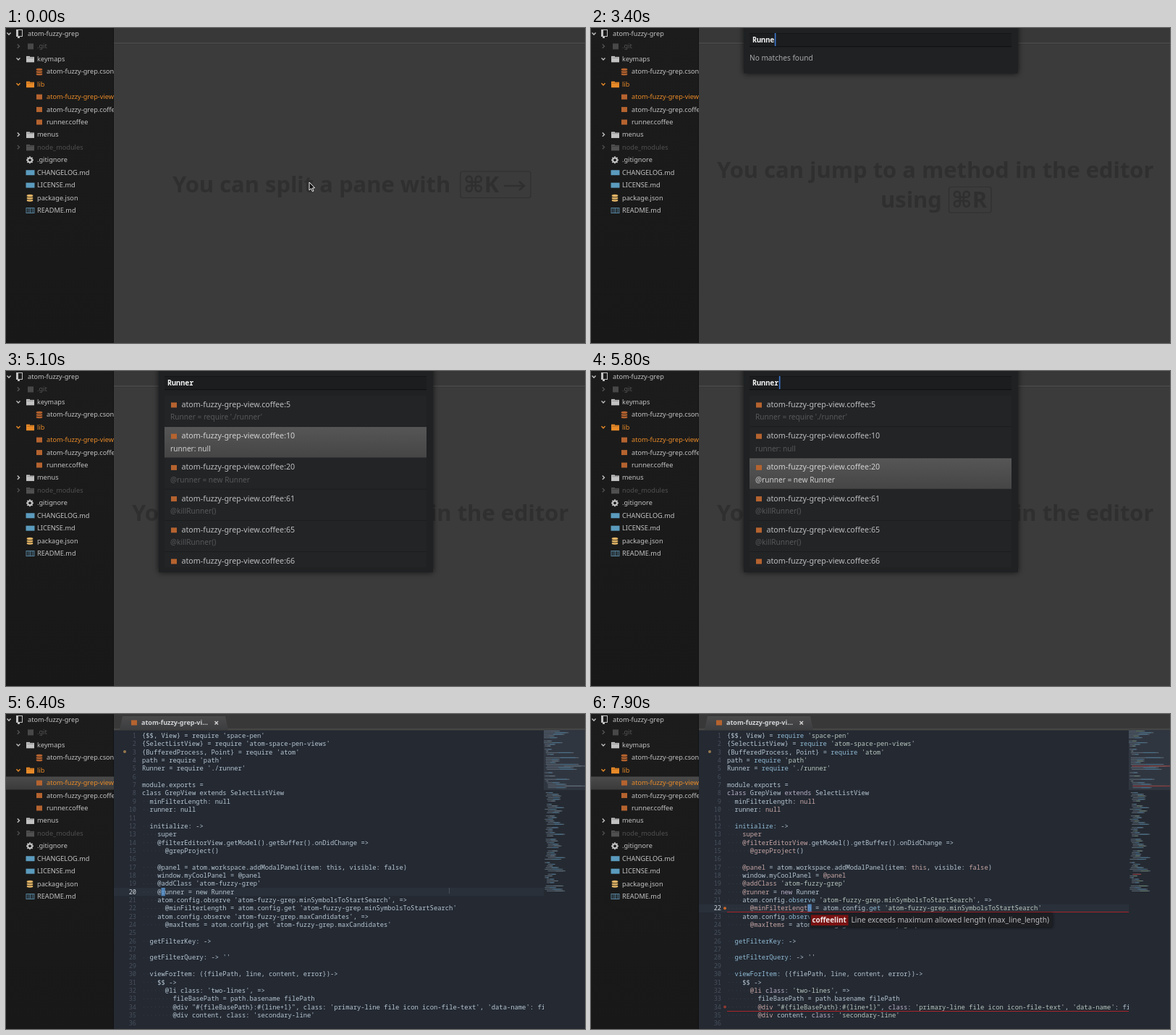
An HTML page with a canvas that plays this animation: 800 by 435 pixels, repeating every 8000 ms.

```html
<!DOCTYPE html>
<html lang="en">
<head>
<meta charset="utf-8">
<title>atom-fuzzy-grep</title>
<style>
html, body { margin: 0; width: 100%; height: 100%; overflow: hidden; background: #3b3b3b; }
canvas { display: block; width: 800px; height: 435px; }
</style>
</head>
<body>
<canvas id="stage" width="800" height="435"></canvas>
<script>
const ctx = document.getElementById('stage').getContext('2d');
const LOOP = 8000;
const UI = '"Noto Sans", "Open Sans", sans-serif';
const MONO = '"Noto Sans Mono", "DejaVu Sans Mono", monospace';
const ORANGE = '#e88a28', CUP = '#b5632f', LABEL = '#c2c2c2';
const CODE_X = 188, CHAR_W = 5.305, LINE_H = 11.35, LINE_Y = 30;

const tree = [
  // depth, label, icon, chevron, colour, icon tint
  [0, 'atom-fuzzy-grep', 'repo', 'down', LABEL],
  [1, '.git', 'git', 'right', '#555'],
  [1, 'keymaps', 'folder', 'down', LABEL],
  [2, 'atom-fuzzy-grep.cson', 'data', '', LABEL, CUP],
  [1, 'lib', 'folder', 'down', ORANGE],
  [2, 'atom-fuzzy-grep-view.coffee', 'cup', '', ORANGE],
  [2, 'atom-fuzzy-grep.coffee', 'cup', '', LABEL],
  [2, 'runner.coffee', 'cup', '', LABEL],
  [1, 'menus', 'folder', 'right', LABEL],
  [1, 'node_modules', 'folder', 'right', '#505050'],
  [1, '.gitignore', 'gear', '', LABEL],
  [1, 'CHANGELOG.md', 'doc', '', LABEL],
  [1, 'LICENSE.md', 'doc', '', LABEL],
  [1, 'package.json', 'data', '', LABEL, '#e3b566'],
  [1, 'README.md', 'book', '', LABEL]
];

const results = [
  [5, "Runner = require './runner'"],
  [10, 'runner: null'],
  [20, '@runner = new Runner'],
  [61, '@killRunner()'],
  [65, '@killRunner()'],
  [66, '']
];

const code = `{$$, View} = require 'space-pen'
{SelectListView} = require 'atom-space-pen-views'
{BufferedProcess, Point} = require 'atom'
path = require 'path'
Runner = require './runner'

module.exports =
class GrepView extends SelectListView
  minFilterLength: null
  runner: null

  initialize: ->
    super
    @filterEditorView.getModel().getBuffer().onDidChange =>
      @grepProject()

    @panel = atom.workspace.addModalPanel(item: this, visible: false)
    window.myCoolPanel = @panel
    @addClass 'atom-fuzzy-grep'
    @runner = new Runner
    atom.config.observe 'atom-fuzzy-grep.minSymbolsToStartSearch', =>
      @minFilterLength = atom.config.get 'atom-fuzzy-grep.minSymbolsToStartSearch'
    atom.config.observe 'atom-fuzzy-grep.maxCandidates', =>
      @maxItems = atom.config.get 'atom-fuzzy-grep.maxCandidates'

  getFilterKey: ->

  getFilterQuery: -> ''

  viewForItem: ({filePath, line, content, error})->
    $$ ->
      @li class: 'two-lines', =>
        fileBasePath = path.basename filePath
        @div "#{fileBasePath}:#{line+1}", class: 'primary-line file icon icon-file-text', 'data-name': fileBasePath
        @div content, class: 'secondary-line'
`.split('\n');

function rect(x, y, w, h, fill) {
  ctx.fillStyle = fill;
  ctx.fillRect(x, y, w, h);
}

function text(str, x, y, size, color, weight = 400, family = UI) {
  ctx.font = `${weight} ${size}px ${family}`;
  ctx.fillStyle = color;
  ctx.fillText(str, x, y);
}

function line(points, color, width = 1) {
  ctx.beginPath();
  points.forEach(([x, y]) => ctx.lineTo(x, y));
  ctx.strokeStyle = color;
  ctx.lineWidth = width;
  ctx.stroke();
}

function vertical(y0, y1, from, to) {
  const g = ctx.createLinearGradient(0, y0, 0, y1);
  g.addColorStop(0, from);
  g.addColorStop(1, to);
  return g;
}

function clipped(x, y, w, h, draw) {
  ctx.save();
  ctx.beginPath();
  ctx.rect(x, y, w, h);
  ctx.clip();
  draw();
  ctx.restore();
}

const ramp = (t, a, b) => Math.min(1, Math.max(0, (t - a) / (b - a)));

function chevron(dir, x, y, color) {
  const pts = dir === 'down'
    ? [[x - 2.5, y - 1.2], [x, y + 1.5], [x + 2.5, y - 1.2]]
    : [[x - 1.2, y - 2.7], [x + 1.5, y], [x - 1.2, y + 2.7]];
  line(pts, color, 1.4);
}

const icons = {
  repo(x, y) {
    ctx.strokeStyle = LABEL;
    ctx.lineWidth = 1;
    ctx.strokeRect(x - 3.5, y - 5.5, 8, 9);
    rect(x - 3, y - 5, 2, 9, LABEL);
    rect(x - 2, y + 3, 3, 3, LABEL);
  },
  git(x, y) { rect(x - 3, y - 4, 8, 8, '#484848'); },
  folder(x, y, color) {
    rect(x - 5, y - 4, 5, 3, color);
    rect(x - 5, y - 3, 11, 7.5, color);
    rect(x - 4, y - 2, 9, 0.7, 'rgba(0,0,0,.35)');
  },
  data(x, y, color) {
    for (let i = 2; i >= 0; i--) {
      ctx.beginPath();
      ctx.ellipse(x, y - 3 + i * 3.2, 4.6, 2.1, 0, 0, 7);
      ctx.fillStyle = color;
      ctx.fill();
      ctx.strokeStyle = '#1b1b1b';
      ctx.lineWidth = 0.7;
      ctx.stroke();
    }
  },
  cup(x, y) { rect(x - 4, y - 3.5, 8, 7, CUP); },
  doc(x, y) { rect(x - 5.5, y - 3.5, 12, 7, '#5b9bbd'); },
  gear(x, y) {
    ctx.strokeStyle = LABEL;
    ctx.lineWidth = 2;
    ctx.beginPath();
    ctx.arc(x, y, 2.9, 0, 7);
    ctx.stroke();
    for (let i = 0; i < 8; i++) {
      const c = Math.cos(i * Math.PI / 4), s = Math.sin(i * Math.PI / 4);
      line([[x + 3 * c, y + 3 * s], [x + 5 * c, y + 5 * s]], LABEL, 1.8);
    }
  },
  book(x, y) {
    ctx.strokeStyle = '#54809a';
    ctx.lineWidth = 1;
    ctx.strokeRect(x - 5, y - 3.5, 5.5, 7);
    ctx.strokeRect(x + 0.5, y - 3.5, 5.5, 7);
    for (let i = -1; i <= 1; i++) {
      rect(x - 3.5, y + i * 2 - 0.4, 3, 0.8, '#54809a');
      rect(x + 2, y + i * 2 - 0.4, 3, 0.8, '#54809a');
    }
  }
};

function sidebar(selected) {
  rect(0, 0, 149, 435, vertical(0, 435, '#1c1c1c', '#181818'));
  rect(148, 0, 1, 435, '#121212');
  clipped(0, 0, 149, 435, () => {
    if (selected) rect(0, 86.5, 149, 18, vertical(86, 105, '#4b4b4b', '#3a3a3a'));
    tree.forEach(([depth, label, icon, arrow, color, tint], i) => {
      const y = 8 + i * 17.43;
      if (arrow) chevron(arrow, depth ? 17 : 4, y - 0.3, color);
      icons[icon]([18, 33, 46][depth], y, tint || color);
      text(label, [30, 43, 56][depth], y + 3, 9.2, color, 500);
    });
  });
}

function keyBox(x, y, w, h) {
  ctx.beginPath();
  ctx.roundRect(x, y, w, h, 3);
  ctx.strokeStyle = '#2f2f2f';
  ctx.lineWidth = 1.2;
  ctx.stroke();
}

function topBar() {
  rect(149, 0, 651, 20, '#383838');
  rect(149, 20, 651, 2, '#464646');
  rect(149, 22, 651, 1, '#353535');
}

function emptyPane(t) {
  rect(149, 0, 651, 435, '#3b3b3b');
  topBar();
  const tip = (s, x, y) => text(s, x, y, 30.9, '#2f2f2f', 700, '"Noto Sans", "DejaVu Sans", sans-serif');
  ctx.globalAlpha = 0.9 * (1 - ramp(t, 1900, 2700));
  if (ctx.globalAlpha > 0) {
    tip('You can split a pane with', 230, 227);
    tip('⌘K', 632, 227);
    line([[688, 218], [716, 218]], '#2f2f2f', 2.5);
    line([[709, 212], [716, 218], [709, 224]], '#2f2f2f', 2.5);
    keyBox(628, 198, 97, 36.5);
  }
  ctx.globalAlpha = 0.9 * ramp(t, 2700, 3300);
  if (ctx.globalAlpha > 0) {
    tip('You can jump to a method in the editor', 174, 207);
    tip('using', 400, 248);
    tip('⌘R', 498, 248);
    keyBox(494.5, 219.5, 58.5, 35.5);
  }
  ctx.globalAlpha = 1;
}

function panel(t) {
  const query = 'Runner'.slice(0, Math.max(0, Math.floor((t - 2300) / 200)));
  const listed = t >= 3600;
  const h = listed ? 278 : query ? 62.5 : 42;
  ctx.save();
  ctx.shadowColor = 'rgba(0,0,0,.7)';
  ctx.shadowBlur = 8;
  rect(211, -10, 379, h + 10, '#1f2123');
  ctx.restore();
  rect(219, 7, 362, 19, '#1b1d1f');
  rect(219, 7, 362, 1, '#141517');
  rect(219, 25, 362, 1.2, '#101113');
  text(query, 223, 19.7, 10.1, '#f2f2f2', 700, MONO);
  const typing = query && !listed;
  if (typing || Math.floor(t / 500) % 2) rect(223.5 + query.length * 6.06, 7, 1.6, 18, '#3e78d0');
  if (!listed) {
    if (query) text('No matches found', 219, 45, 10.1, '#a9a9a9');
    return;
  }
  const selected = t < 4800 ? 0 : t < 5400 ? 1 : 2;
  clipped(219, 34, 362, 237, () => {
    results.forEach(([num, body], i) => {
      const y = 34 + i * 43.2, on = i === selected;
      rect(219, y, 362, 43.2, on ? vertical(y, y + 43, '#565656', '#454545') : '#222426');
      rect(219, y + 42.4, 362, 0.8, '#191b1d');
      icons.cup(232, y + 13);
      text('atom-fuzzy-grep-view.coffee:' + num, 242.5, y + 16, 10.7, on ? '#d2d2d2' : '#bdbdbd');
      text(body, 227, y + 33.3, 10.1, on ? '#cfcfcf' : '#575859');
    });
  });
}

const syntax = [
  [/^['"]/, '#b7c6bd'],
  [/^(require|get|observe|\w+:)$/, '#8fb9d3'],
  [/^(@\w+|null|this|false|super)$/, '#c6a6a4'],
  [/^(class|extends|new)$/, '#b9b0c8']
];

function codeLine(src, y, colored) {
  const indent = src.search(/\S|$/);
  for (let i = 0; i < indent; i++) rect(CODE_X + (i + 0.4) * CHAR_W, y - 0.4, 1, 1, '#39414c');
  for (const m of src.matchAll(/'[^']*'|"[^"]*"|\w+:(?= ?->| \()|@\w+|\w+|[^'"\s\w@]+/g)) {
    const rule = colored && syntax.find(([re]) => re.test(m[0]));
    text(m[0], CODE_X + m.index * CHAR_W, y + 3, CHAR_W / 0.6, rule ? rule[1] : '#b4c5d2', 500, MONO);
  }
}

function minimap(lint, colored) {
  rect(743, 22, 57, 413, '#252a32');
  rect(743, 22, 57, 83, '#303640');
  let seed = 7;
  const rand = () => (seed = seed * 16807 % 2147483647) / 2147483647;
  for (let i = 0; i < 97; i++) {
    const known = i < code.length;
    const src = known ? code[i] : '';
    const indent = known ? src.search(/\S|$/) : 2 + 2 * Math.floor(rand() * 4);
    const len = known ? src.trim().length : 8 + rand() * 30;
    if (known ? !src : i % 7 === 1) continue;
    const y = 23 + i * 2.3, x = 743 + indent * 0.7;
    const w = Math.min(len * 0.7, 800 - x);
    rect(x, y, w, 1, '#5d6b78');
    rect(x + w * 0.45, y, w * 0.45, 1, i % 3 ? '#4b738e' : colored ? '#6c8472' : '#65737e');
    if (lint && (i === 21 || i === 33 || i === 86)) rect(x, y, w, 1.2, '#8a3a3e');
  }
}

function dot(x, y, color) {
  ctx.beginPath();
  ctx.arc(x, y, 2, 0, 7);
  ctx.fillStyle = color;
  ctx.fill();
}

function tab() {
  ctx.beginPath();
  ctx.moveTo(157, 22);
  ctx.lineTo(161, 3);
  ctx.lineTo(303, 3);
  ctx.lineTo(307, 22);
  ctx.fillStyle = vertical(3, 22, '#4a4a4b', '#3c3d3f');
  ctx.fill();
  icons.cup(177, 12);
  text('atom-fuzzy-grep-vi…', 187, 15, 9, '#d0d3d6', 600);
  line([[288.5, 10], [293, 14.5]], '#cfcfcf', 1.5);
  line([[293, 10], [288.5, 14.5]], '#cfcfcf', 1.5);
}

function editor(t) {
  const colored = t >= 6500, lint = t >= 7000, moved = t >= 7500;
  const row = moved ? 21 : 19, col = moved ? 21 : 5;
  rect(149, 22, 651, 413, '#242932');
  topBar();
  tab();

  clipped(149, 23, 594, 412, () => {
    const cy = LINE_Y + row * LINE_H;
    rect(149, cy - 5.7, 594, LINE_H, '#2a303a');
    code.forEach((src, i) => {
      const y = LINE_Y + i * LINE_H;
      ctx.textAlign = 'right';
      text(i + 1, 180, y + 3, 8.6, i === row ? '#d3d8de' : '#48505b', 400, MONO);
      ctx.textAlign = 'left';
      codeLine(src, y, colored);
    });
    rect(CODE_X + col * CHAR_W, cy - 5.7, CHAR_W, LINE_H, 'rgba(91,151,212,.8)');
    dot(164, 52, '#96794f');
    if (lint) {
      for (const i of [21, 33]) {
        const y = LINE_Y + i * LINE_H;
        rect(CODE_X, Math.round(y + 5), 555, 1, '#a82429');
        dot(185, y, i === 21 ? '#c6672d' : '#8d3a32');
      }
    }
  });
  minimap(lint, colored);
  if (!moved) rect(612, 240, 1, 8, '#474f5a');

  if (t >= 7600) {
    ctx.save();
    ctx.shadowColor = 'rgba(0,0,0,.6)';
    ctx.shadowBlur = 4;
    rect(302, 275, 336, 19.5, '#1c1e22');
    ctx.restore();
    rect(304, 277.5, 51.5, 14.5, '#7a1212');
    text('coffeelint', 305.5, 288.2, 9.9, '#f0eaea', 700);
    text('Line exceeds maximum allowed length (max_line_length)', 359.5, 288.2, 10.25, '#b9bbbd');
  }
}

function pointer(t) {
  if (t >= 900) return;
  const k = ramp(t, 100, 800), e = k * k * (3 - 2 * k);
  ctx.save();
  ctx.translate(419 + 203 * e, 213 + 27 * e);
  ctx.beginPath();
  [[0, 0], [0, 11], [2.6, 8.6], [4.3, 12.7], [6, 12], [4.4, 8], [7.6, 7.8]].forEach(([x, y]) => ctx.lineTo(x, y));
  ctx.closePath();
  ctx.fillStyle = '#111';
  ctx.fill();
  ctx.strokeStyle = '#f0f0f0';
  ctx.lineWidth = 1;
  ctx.stroke();
  ctx.restore();
}

function draw(t) {
  const open = t >= 6400;
  if (open) {
    editor(t);
  } else {
    emptyPane(t);
    if (t >= 1200 && t < 5900) panel(t);
  }
  sidebar(open);
  pointer(t);
}

let start;
function tick(now) {
  start ??= now;
  draw((now - start) % LOOP);
  requestAnimationFrame(tick);
}
draw(0);
requestAnimationFrame(tick);
</script>
</body>
</html>
```
